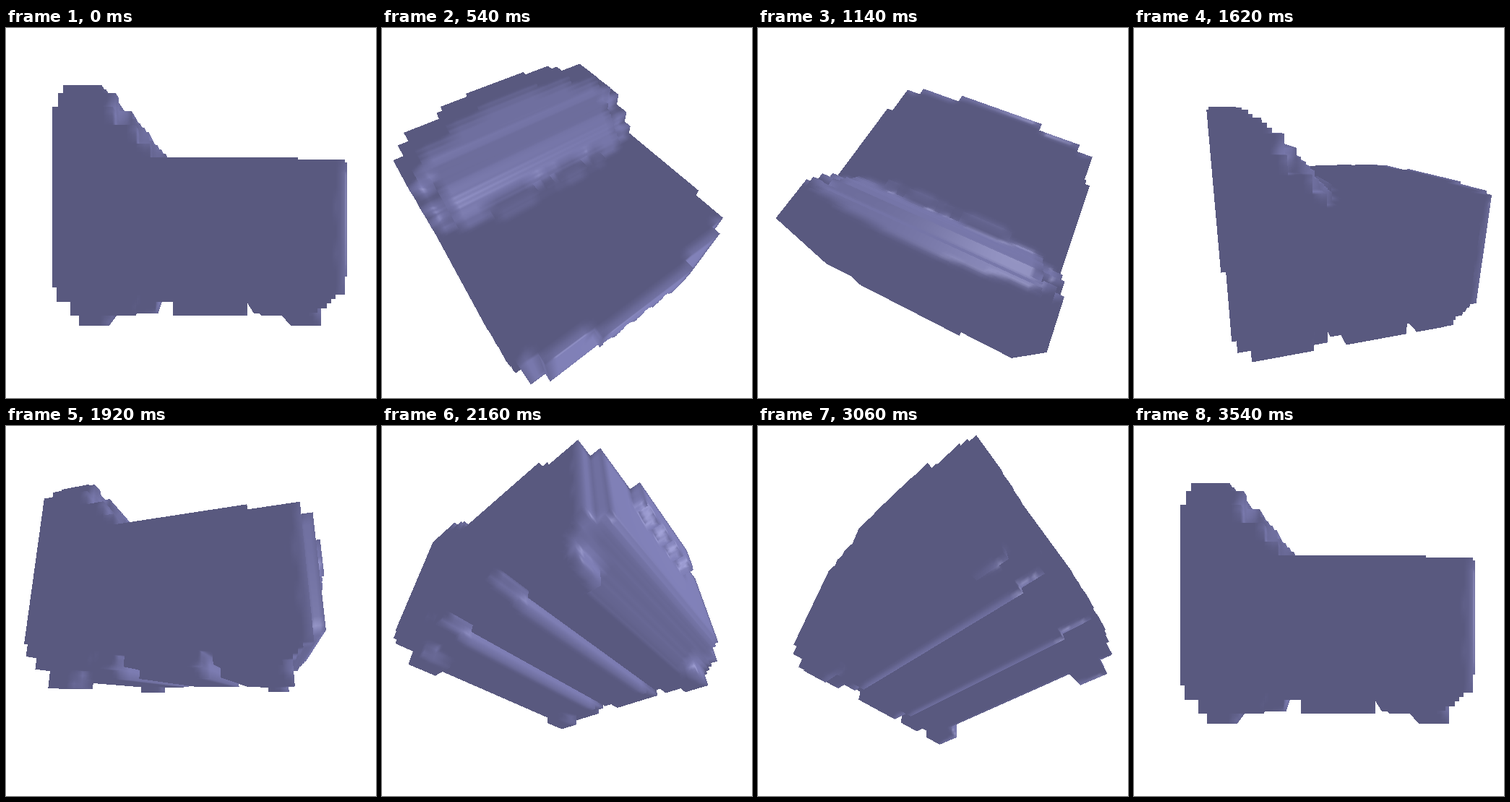
These frames come from a looping animation (512x512 px, 3.6 s). An HTML page with a canvas:

```html
<!DOCTYPE html>
<html lang="en">
<head>
<meta charset="utf-8">
<title>Turning block</title>
<style>
html, body { margin: 0; width: 100%; height: 100%; overflow: hidden; background: #fff; }
canvas { display: block; width: 512px; height: 512px; }
</style>
</head>
<body>
<canvas id="stage" width="512" height="512"></canvas>
<script>
const SIZE = 512, N = 84, CELL = 0.025, ORIGIN = -N * CELL / 2;
const FRAMES = 60, STEP = 60, DIST = 2.7, FOCAL = SIZE / 2 / Math.tan(Math.PI / 6);
const LIGHT = [3, 0, 0], CENTRE = 0.08, HALF = 0.905;

// First value whose limit lies above v: pick(v, limit, value, ..., fallback)
function pick(v, ...steps) {
  let i = 0;
  while (i + 1 < steps.length) {
    if (v < steps[i]) return steps[i + 1];
    i += 2;
  }
  return steps[i];
}
const within = (v, a, b) => v > a && v < b;

function rearLimit(y, u) {
  if (y > -0.2 && u < 0.45) return -0.8;
  return pick(y, -0.47, -0.66, -0.4, -0.72, -0.75);
}

function frontLimit(y, z, u) {
  if (u < 0.37) return y > 0.06 + 0.05 * Math.sin(z * 36) ? 1 : 0.93;
  if (u < 0.72) return 0.93;
  if (u < 0.85) return 0.85;
  return pick(y, -0.3, 0.66, -0.14, 0.74, -0.04, 0.67, 0.12, 0.74, 0.2, 0.66, 0.58);
}

// Front edge of the raised rear part: a slope with a ledge, cushioned in the middle
function ridgeLimit(y, z, u) {
  const notch = within(z, 0.13, 0.2) || within(z, -0.01, 0.06) || within(z, -0.33, -0.26);
  if (u > 0.74) return pick(y, 0.38, -0.22, 0.48, -0.31, -0.42);
  if (y < 0.36) return notch ? -0.2 : u < 0.5 ? -0.08 : -0.16;
  if (y < 0.6) return -0.18 - (y - 0.36) * 0.8;
  if (y < 0.66) return -0.42;
  return -0.46 - (y - 0.66) * 0.9;
}

function floorAt(x, u) {
  if (within(u, 0.57, 0.78) && (within(x, -0.665, -0.485) || within(x, 0.575, 0.75))) return -0.66;
  if (within(x, -0.2, -0.11) || within(x, 0.29, 0.37)) return -0.47;
  if (u > 0.84 && (within(x, -0.31, -0.13) || within(x, 0.58, 0.68))) return -0.42;
  if (x < -0.66) return u < 0.7 ? -0.58 : -0.5;
  const base = u < 0.7 ? -0.6 : -0.56;
  return Math.max(base, -0.56 + (x - 0.68) * 0.75);
}

function inside(x, y, z) {
  const u = Math.abs(z - CENTRE);
  if (u > HALF || x < rearLimit(y, u) || x > frontLimit(y, z, u) || y < floorAt(x, u)) return 0;
  if (y < 0.3) return 1;
  const top = pick(u, 0.24, 0.83, 0.5, 0.8, 0.74, 0.75, 0.81, 0.667, 0.58);
  return y < top && x < ridgeLimit(y, z, u) ? 1 : 0;
}

const at = (i, j, k) => i + N * (j + N * k);
const cells = new Uint8Array(N * N * N);
const mid = i => ORIGIN + (i + 0.5) * CELL;
for (let k = 0; k < N; k++)
  for (let j = 0; j < N; j++)
    for (let i = 0; i < N; i++) cells[at(i, j, k)] = inside(mid(i), mid(j), mid(k));

// Surface quads with shared corners
const ids = new Map(), verts = [], quads = [], REACH = 3;

function normalAt(p) {
  const n = [0, 0, 0];
  for (let c = -REACH; c < REACH; c++)
    for (let b = -REACH; b < REACH; b++)
      for (let a = -REACH; a < REACH; a++)
        if (cells[at(p[0] + a, p[1] + b, p[2] + c)]) {
          n[0] -= a + 0.5;
          n[1] -= b + 0.5;
          n[2] -= c + 0.5;
        }
  const len = Math.hypot(...n) || 1;
  return n.map(v => v / len);
}

function corner(p) {
  const key = at(...p);
  if (!ids.has(key)) {
    const pos = p.map(v => ORIGIN + v * CELL), n = normalAt(p);
    const l = pos.map((v, i) => LIGHT[i] - v), len = Math.hypot(...l);
    const dir = l.map(v => v / len);
    const diffuse = Math.max(0, n[0] * dir[0] + n[1] * dir[1] + n[2] * dir[2]);
    ids.set(key, verts.length);
    verts.push({ pos, n, dir, diffuse, x: 0, y: 0, w: 0, spec: 0 });
  }
  return verts[ids.get(key)];
}

function addFace(cell, axis, sign) {
  const b = (axis + 1) % 3, c = (axis + 2) % 3;
  const quad = [[0, 0], [1, 0], [1, 1], [0, 1]].map(([db, dc]) => {
    const p = cell.slice();
    if (sign > 0) p[axis]++;
    p[b] += db;
    p[c] += dc;
    return corner(p);
  });
  quads.push(sign > 0 ? quad : quad.reverse());
}

for (let k = 1; k < N - 1; k++)
  for (let j = 1; j < N - 1; j++)
    for (let i = 1; i < N - 1; i++) {
      if (!cells[at(i, j, k)]) continue;
      for (let axis = 0; axis < 3; axis++)
        for (const sign of [-1, 1]) {
          const next = [i, j, k];
          next[axis] += sign;
          if (!cells[at(...next)]) addFace([i, j, k], axis, sign);
        }
    }

const ctx = document.getElementById("stage").getContext("2d");
const image = ctx.createImageData(SIZE, SIZE);
const pixels = new Uint32Array(image.data.buffer);
const depth = new Float32Array(SIZE * SIZE);

function triangle(a, b, c) {
  const area = (b.x - a.x) * (c.y - a.y) - (c.x - a.x) * (b.y - a.y);
  if (area >= 0) return;
  const x0 = Math.max(0, Math.ceil(Math.min(a.x, b.x, c.x)));
  const x1 = Math.min(SIZE - 1, Math.floor(Math.max(a.x, b.x, c.x)));
  const y0 = Math.max(0, Math.ceil(Math.min(a.y, b.y, c.y)));
  const y1 = Math.min(SIZE - 1, Math.floor(Math.max(a.y, b.y, c.y)));
  for (let y = y0; y <= y1; y++)
    for (let x = x0; x <= x1; x++) {
      const p = ((b.x - x) * (c.y - y) - (c.x - x) * (b.y - y)) / area;
      const q = ((c.x - x) * (a.y - y) - (a.x - x) * (c.y - y)) / area;
      const r = 1 - p - q;
      if (p < -1e-6 || q < -1e-6 || r < -1e-6) continue;
      const w = p * a.w + q * b.w + r * c.w, at = y * SIZE + x;
      if (w <= depth[at]) continue;
      depth[at] = w;
      const lit = 0.5 + 0.23 * (p * a.diffuse + q * b.diffuse + r * c.diffuse);
      const shine = 40 * (p * a.spec + q * b.spec + r * c.spec);
      const red = Math.min(255, 178.5 * lit + shine), blue = Math.min(255, 255 * lit + shine);
      pixels[at] = 0xff000000 | blue << 16 | red << 8 | red;
    }
}

function draw(frame) {
  const t = frame / (FRAMES - 1) * 2 * Math.PI;
  const c = Math.cos(t), s = Math.sin(t), flip = c < 0 ? -1 : 1;
  const eye = [s * c, s, c * c];
  for (const v of verts) {
    const [x, y, z] = v.pos;
    v.w = FOCAL / (DIST - (eye[0] * x + eye[1] * y + eye[2] * z));
    v.x = SIZE / 2 + flip * v.w * (c * x - s * z);
    v.y = SIZE / 2 - flip * v.w * (c * y - s * s * x - s * c * z);
    v.spec = 0;
    if (v.diffuse > 0) {
      const h = v.dir.map((d, i) => d + eye[i]);
      const dot = v.n[0] * h[0] + v.n[1] * h[1] + v.n[2] * h[2];
      v.spec = Math.pow(Math.max(0, dot / (Math.hypot(...h) || 1)), 80);
    }
  }
  pixels.fill(0xffffffff);
  depth.fill(0);
  for (const [a, b, d, e] of quads) {
    triangle(a, b, d);
    triangle(a, d, e);
  }
  ctx.putImageData(image, 0, 0);
}

let shown = -1;
const start = performance.now();
function tick() {
  const frame = Math.floor(Math.max(0, performance.now() - start) / STEP) % FRAMES;
  if (frame !== shown) draw(shown = frame);
  requestAnimationFrame(tick);
}
tick();
</script>
</body>
</html>
```
